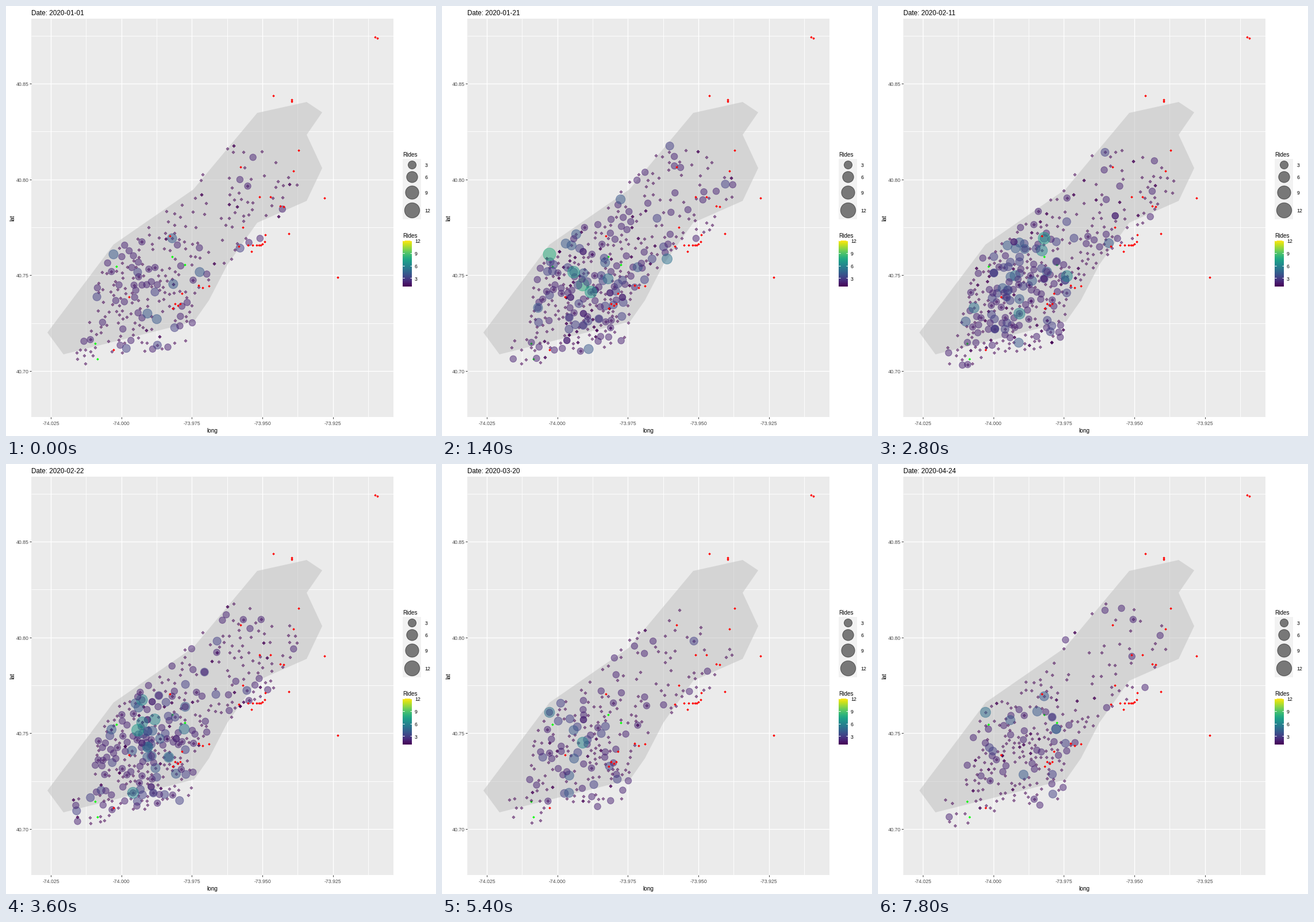
A matplotlib script for the animation above (8000 ms loop, 748 px wide and 748 px high).

```python
import numpy as np
import matplotlib.pyplot as plt
from matplotlib.animation import FuncAnimation
from matplotlib.patches import Polygon, Rectangle
from matplotlib.path import Path

SIZE, DPI = 748, 64
PT = 72 / DPI  # points per pixel
FRAMES, STEP = 40, 200
START = np.datetime64("2020-01-01")
VIRIDIS = plt.get_cmap("viridis")

plt.rcParams["font.family"] = ["Liberation Sans", "DejaVu Sans"]

ZONE = [(72, 568), (187, 415), (326, 319), (437, 186), (523, 167), (550, 185),
        (523, 224), (550, 282), (523, 339), (437, 377), (385, 450), (353, 512),
        (327, 549), (100, 606)]

# shoreline around the stations, and the park without any
SHORE = [(187, 427), (245, 388), (292, 340), (338, 293), (395, 238), (436, 249),
         (482, 264), (500, 284), (529, 317), (490, 347), (463, 395), (428, 414),
         (395, 440), (362, 468), (328, 505), (325, 555), (317, 580), (275, 598),
         (188, 604), (168, 624), (130, 632), (116, 608), (116, 580), (146, 568),
         (143, 540), (157, 510), (160, 475)]
PARK = [(325, 395), (352, 400), (395, 335), (360, 350)]

RED = [(642, 54), (646, 56), (465, 156), (497, 163), (497, 166), (509, 251),
       (408, 280), (500, 287), (441, 332), (460, 332), (477, 348), (483, 349),
       (554, 334), (492, 396), (451, 398), (412, 385), (450, 410), (446, 414),
       (405, 418), (427, 427), (285, 400), (577, 472), (335, 486), (353, 487),
       (342, 490), (306, 500), (214, 506), (187, 598)]
RED += [(x, 416) for x in (421, 429, 436, 440, 443)]
RED += [(290, 526), (294, 518), (299, 521), (303, 518)]
GREEN = [(192, 453), (289, 436), (311, 450), (155, 587), (159, 614)]

CENTER = (250, 485)
HUBS = np.array([(310, 461), (229, 463), (221, 572), (187, 432), (167, 525),
                 (246, 535), (289, 404), (323, 450)])


def make_stations():
    """Scatter stations ashore, closer together toward downtown."""
    rng = np.random.default_rng(11)
    shore, park = Path(SHORE), Path(PARK)
    pts = HUBS.astype(float)
    for p in rng.uniform((110, 235), (530, 635), (14000, 2)):
        gap = np.interp(p[1], (240, 390, 450), (11, 9, 7.5))
        if (shore.contains_point(p) and not park.contains_point(p)
                and np.hypot(*(pts - p).T).min() > gap):
            pts = np.vstack([pts, p])
    return pts


STATIONS = make_stations()
DIST = np.hypot(*(STATIONS - CENTER).T)
POPULAR = np.exp(-(DIST / 95) ** 2)
WEIGHTS = (.6 + POPULAR) / (.6 + POPULAR).sum()


def radius(n):
    size = 2 + 10 * np.sqrt((np.asarray(n, float) - 1) / 11)
    return .375 * (size * 2.845 + .945)


def area(r):
    return (2 * np.asarray(r) * PT) ** 2


def demand(day):
    """How busy a day is, from 0 (holiday or lockdown) to 1."""
    return np.interp(day, (0, 4, 68, 78, 114), (.12, .9, 1, 0, .1))


def rides(day):
    """Places and ride counts for one day."""
    rng = np.random.default_rng(500 + day)
    busy = demand(day)
    first = int(200 + 110 * busy + rng.integers(-10, 10))
    again = int(50 + 100 * busy)
    pick = np.concatenate([
        rng.choice(len(STATIONS), min(first, len(STATIONS)), False, WEIGHTS),
        rng.choice(len(STATIONS), again, True, WEIGHTS)])
    mean = 1.12 + .15 * busy + (.3 + .35 * busy) * POPULAR[pick]
    n = np.minimum(rng.geometric(1 / mean), 8)
    hubs = rng.choice(len(HUBS), 3, replace=False)
    peak = rng.integers(4, 6 + int(4 * busy), 3)
    return (np.vstack([STATIONS[pick], HUBS[hubs]]),
            np.concatenate([n, peak]))


fig = plt.figure(figsize=(SIZE / DPI, SIZE / DPI), dpi=DPI, facecolor="white")
ax = fig.add_axes([0, 0, 1, 1])
ax.axis("off")


def text(x, y, s, px, color="black", **kw):
    kw = {"va": "center_baseline", "ha": "left", **kw}
    return ax.text(x, y, s, fontsize=px * PT, color=color, **kw)


def line(x, y, color, px, z):
    ax.plot(x, y, color=color, lw=px * PT, zorder=z, solid_capstyle="butt")


def box(x, y, w, h, color):
    ax.add_patch(Rectangle((x, y), w, h, fc=color, lw=0, zorder=0))


# panel and grid
L, R, T, B = 44, 674, 22, 715
box(L, T, R - L, B - T, "#EBEBEB")
for k in range(5):
    x = 78 + 122.65 * k
    line((x + 61.3, x + 61.3), (T, B), "white", .9, 1)
    line((x, x), (T, B), "white", 1.4, 1)
    line((x, x), (B, B + 3), "#333333", 1, 1)
    text(x, 725.5, f"{-74.025 + .025 * k:.3f}", 8.8, "#4D4D4D", ha="center")
for k in range(4):
    y = 135 + 166.6 * k
    line((L, R), (y - 83.3, y - 83.3), "white", .9, 1)
    line((L, R), (y, y), "white", 1.4, 1)
    line((L - 3, L), (y, y), "#333333", 1, 1)
    text(39.5, y + .5, f"{40.85 - .05 * k:.2f}", 8.8, "#4D4D4D", ha="right")
text(359, 738, "long", 10, ha="center")
text(11, 369, "lat", 10, ha="center", va="center", rotation=90)
title = text(44, 16, "", 11.8, va="baseline")

ax.add_patch(Polygon(ZONE, fc="#BEBEBE", alpha=.5, lw=0, zorder=2))

# size legend
text(690, 257.5, "Rides", 10)
box(690, 266, 32.5, 105, "#F2F2F2")
for n, y in zip((3, 6, 9, 12), (275.5, 296.5, 323.5, 355)):
    ax.scatter(706, y, s=area(radius(n)), fc=(0, 0, 0, .5), ec=(0, 0, 0, .5),
               lw=PT, zorder=3)
    text(728.5, y + .8, str(n), 8.8)

# colour legend
text(690, 398.5, "Rides", 10)
ax.imshow(np.linspace(1, 0, 160)[:, None], cmap=VIRIDIS, aspect="auto",
          extent=(690, 706, 488, 408), zorder=3)
for n in (3, 6, 9, 12):
    y = 488 - 80 * (n - 1) / 11
    for x in (690, 702.8):
        line((x, x + 3.2), (y, y), "white", 1, 4)
    text(711, y + .8, str(n), 8.8)

# markers: single rides are tiny diamonds, the rest circles
ax.scatter(*zip(*GREEN), s=area(1.6), c="#00FF00", marker="D", lw=0, zorder=4)
singles = ax.scatter([], [], s=area(1.75), marker="D", lw=PT, zorder=5)
circles = ax.scatter([], [], lw=PT, zorder=5)
ax.scatter(*zip(*RED), s=area(1.6), c="#FF0000", marker="D", lw=0, zorder=6)
singles.set_facecolor((*VIRIDIS(0.)[:3], .5))
singles.set_edgecolor((*VIRIDIS(0.)[:3], .5))
ax.set_xlim(0, SIZE)
ax.set_ylim(SIZE, 0)


def draw(i):
    day = int(2.95 * i - .2)
    xy, n = rides(day)
    one = n == 1
    singles.set_offsets(xy[one])
    xy, n = xy[~one], n[~one]
    colors = VIRIDIS((n - 1) / 11)
    colors[:, 3] = .5
    circles.set_offsets(xy)
    circles.set_sizes(area(radius(n)))
    circles.set_facecolor(colors)
    circles.set_edgecolor(colors)
    title.set_text(f"Date: {START + np.timedelta64(day, 'D')}")
    return singles, circles, title


anim = FuncAnimation(fig, draw, frames=FRAMES, interval=STEP, repeat=True,
                     repeat_delay=0, blit=False)
plt.show()
```
